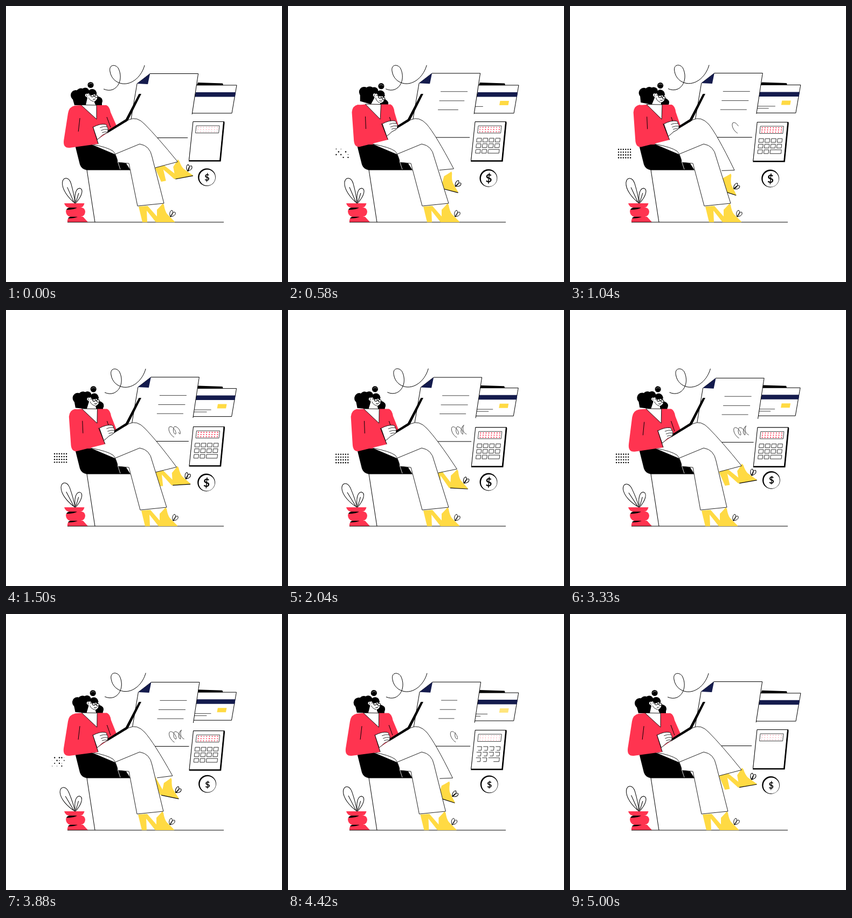
Recreate the animation shown at these times as an HTML page with a canvas. Size 512 px wide and 512 px high, loop 5040 ms.

```html
<!DOCTYPE html>
<html lang="en">
<head>
<meta charset="utf-8">
<title>Working with a laptop</title>
<style>
html, body { margin: 0; width: 100%; height: 100%; overflow: hidden; background: #fff; }
canvas { display: block; width: 100vmin; height: 100vmin; }
</style>
</head>
<body>
<canvas id="stage" width="512" height="512"></canvas>
<script>
const LOOP = 5040;
const RED = '#ff3450', YELLOW = '#ffda43', NAVY = '#141b4d', INK = '#000', GREY = '#444', SEAM = '#222';
const ctx = document.getElementById('stage').getContext('2d');

// Timing helpers
const clamp = v => Math.max(0, Math.min(1, v));
const ramp = (t, a, b) => clamp((t - a) / (b - a));
const angle = t => t / LOOP * Math.PI * 2;
const wave = (t, lag) => (1 - Math.cos(angle(t - lag))) / 2;
const shown = (t, a, b, c, d) => Math.min(ramp(t, a, b), 1 - ramp(t, c, d));

const TYPING = [[0, .02], [580, 1], [1500, 1], [2630, .93], [3330, .15], [3880, 0], [LOOP, .02]];
const LEAN = [[0, 0], [580, 1], [1500, .32], [2630, .22], [3330, .38], [3880, .26], [LOOP, 0]];
const STEP = [[0, 0], [580, 5], [1500, 5], [2630, 5], [3330, -2], [3880, -1], [LOOP, 0]];

function sample(table, t) {
  let i = 1;
  while (i < table.length - 1 && table[i][0] < t) i++;
  const [t0, a] = table[i - 1], [t1, b] = table[i];
  const k = ramp(t, t0, t1);
  return a + (b - a) * (1 - Math.cos(Math.PI * k)) / 2;
}

// Drawing helpers
const NUM = /-?\d+(\.\d+)?/g;
function morph(a, b, k) {
  const end = b.match(NUM);
  let i = 0;
  return a.replace(NUM, n => (+n + (end[i++] - n) * k).toFixed(2));
}

function fill(d, color) {
  ctx.fillStyle = color;
  ctx.fill(new Path2D(d));
}

function line(d, color = INK, width = 1) {
  ctx.strokeStyle = color;
  ctx.lineWidth = width;
  ctx.stroke(new Path2D(d));
}

function shape(d, color, edge = INK, width = 1) {
  fill(d, color);
  line(d, edge, width);
}

function trace(d, length, k, color = GREY) {
  if (k <= 0) return;
  if (k < 1) ctx.setLineDash([length * k, length * 2]);
  line(d, color);
  ctx.setLineDash([]);
}

function disc(x, y, r, color) {
  ctx.fillStyle = color;
  ctx.beginPath();
  ctx.arc(x, y, r, 0, Math.PI * 2);
  ctx.fill();
}

function at(x, y, draw, deg = 0) {
  ctx.save();
  ctx.translate(x, y);
  ctx.rotate(deg * Math.PI / 180);
  draw();
  ctx.restore();
}

const noise = n => {
  const v = Math.sin(n * 91.7 + 3.1) * 4375.85;
  return v - Math.floor(v);
};

// Scenery
function curl(t) {
  at(4 * wave(t, 200), -1.5 * wave(t, 0), () =>
    line('M181 154Q190 158 198 155C212 149 216 130 208 115C202 107 190 109 193 122C195 134 204 142 215 144C235 147 252 129 257 110'));
}

function card(t) {
  at(-wave(t, 300), -3 * wave(t, 300), () => {
    fill('M356 142L402 143.5L403 147H354Z', INK);
    shape('M353 147H428L419 199H345Z', '#fff');
    fill('M352 160H426L425 168.5H350Z', NAVY);
    ctx.globalAlpha = shown(t, 150, 500, 4300, 4700);
    fill('M393.5 176H410L408.5 184H392Z', YELLOW);
    ctx.globalAlpha = 1;
    trace('M346 186.5H381', 35, shown(t, 400, 800, 4300, 4700));
    trace('M345 190.5H373', 28, shown(t, 700, 1100, 4200, 4600));
  });
}

function paper(t) {
  at(4 * wave(t, 290), -Math.sin(angle(t)), () => {
    fill('M267 125.5H356.5L345 201L337 244.5H226L243 144Z', '#fff');
    line('M345 201L356.5 125.5H267L243 144L226 244.5H337');
    fill('M267 125.5L243 144L263 145Z', NAVY);
    [[283, 159.4, 50], [280.5, 176.5, 50], [278, 193.2, 49]].forEach(([x, y, w], i) =>
      trace(`M${x} ${y}h${w}`, w, shown(t, 110 + i * 70, 540 + i * 70, 4200, 4750)));
    trace('M310 237C303 233 298 223 301 218C306 214 315 226 313 231C308 232 307 219 311 217C317 217 323 226 321 231C316 229 317 219 323 214C319 222 323 229 328 231',
      105, shown(t, 700, 1700, 4150, 4750));
  });
}

function keypad(t) {
  const k = shown(t, 120, 590, 4250, 4800);
  const key = (x, y, w, h = 7) =>
    trace(`M${x} ${y}h${w}l-.8 ${h}h${-w}Z`, 2 * (w + h), k, '#333');
  for (let r = 0; r < 3; r++) {
    const y = 245 + r * 10.4, x = 350.5 - r;
    for (let c = 0; c < (r < 2 ? 4 : 2); c++) key(x + c * 11.5, y, 8.5);
    if (r === 2) key(x + 23, y, 20.5);
  }
}

function calculator(t) {
  at(wave(t, 200), 4 * wave(t, 200), () => {
    fill('M347 214H405L405.5 217L398.5 288.5H339Z', INK);
    shape('M347 214.5H403.5L396.5 286.5H339.5Z', '#fff');
    shape('M353 222H396L394.5 235.5H351.5Z', '#fff', GREY);
    for (let r = 0; r < 3; r++) for (let c = 0; c < 8; c++) {
      const d = noise(r * 8 + c) * 200;
      const k = shown(t, 100 + d, 600 + d, 3650 + d, 4200 + d);
      disc(356.5 + c * 5.1 - r * .4, 224.8 + r * 4.1, .55 + .55 * k, RED);
    }
    keypad(t);
  });
}

function coin(t, typing) {
  const s = Math.sin(angle(t));
  at(373 - s, 318 + 2.5 * s, () => {
    disc(-.5, -.4, 16.4, INK);
    disc(.3, .3, 14.8, '#fff');
    ctx.fillStyle = INK;
    ctx.font = `bold ${16 + 4.5 * typing}px Lato, Inter, sans-serif`;
    ctx.textAlign = 'center';
    ctx.textBaseline = 'alphabetic';
    ctx.fillText('$', 0, 6 + 1.5 * typing);
  });
}

function dots(t) {
  at(88 + 2.2 * Math.sin(angle(t)), 265 + 3 * wave(t, 100), () => {
    for (let r = 0; r < 4; r++) for (let c = 0; c < 6; c++) {
      const d = noise(r * 6 + c + 40) * 600;
      const k = shown(t, 250 + d, 400 + d, 3400 + d, 3550 + d);
      if (k) disc(c * 4.4, r * 5.2, 1.2 * k, INK);
    }
  });
}

function plant(t) {
  const k = wave(t, 400);
  at(128, 366, () => {
    line('M0 0C-13 -11 -24 -26 -23 -39C-21 -49.5 -11 -49.5 -7 -37C-4 -26 -1 -14 0 0M-14 -30L-2 -2');
  }, -11 * k);
  at(129, 366, () => {
    line('M0 0C-3 -16 1 -28 8 -28C15 -26 13 -14 0 0M6 -19L1 -3');
  }, -2 * k);
  fill('M108 366H145.5Q144 373 138 374H117Q110 373 108 366Z', RED);
  fill('M118 374H141Q147 376 147 382Q146 390 139 391H119Q111 389 111 380Q113 375 118 374Z', RED);
  fill('M119 391H143L152 401H114Q113 394 119 391Z', RED);
  fill('M112 378Q114 373.5 120 374H132Q126 378 112 378Z', INK);
  fill('M115 394Q117 390.5 122 391H133Q127 394 115 394Z', INK);
}

function seat() {
  line('M114 401H404M150 304L165 401');
  fill('M128 258L170 254L212 275L231 304.5H150Q140 303 137 294Z', INK);
}

// Person
function shoe() {
  fill('M-7 -29L38 -35L45 -16L34 -2L24 -8L10 -26L8 -20Z', '#fff');
  fill('M-7 -29L7 -30L8 -23L9 0H0Z', YELLOW);
  fill('M4 -30L10 -30L31 -6L31 0H25L6 -24Z', YELLOW);
  fill('M27 -23Q34 -30 38 -35L40 -32Q42 -20 46 -15L60 -1V0H27Z', YELLOW);
  line('M52 -10C49 -16 52 -22 55 -22C58 -19 56 -13 52 -10C55 -18 59 -20 61 -18C62 -13 58 -11 52 -10');
}

function legs(t, step) {
  const u = (1 - Math.cos(angle(t - 25) * 3)) / 2;
  at(288 - 41 * u, 326 + 7 * u, () => {
    shoe();
    line('M27 0H60', INK, 1.2);
  }, -11 + 32 * u ** .75);

  const front = morph('L228 211Q243 204 257 219Q281 243 318.5 289', 'L228 211Q243 204 257 219Q271 236 303.5 306.5', u);
  const hem = morph('L277 300', 'L282 306', u);
  fill(`M157 256L187 236${front}${hem}L250 290L248 256L202 275Z`, '#fff');
  line(`M187 236${front}${hem}`, SEAM);

  at(253 + step, 401, shoe);
  const shin = `L228 292L${244 + step} 371L${293 + step} 366L271 280Q267 259 248 256`;
  const under = 'M157 256Q189 262 199 269.5Q205 277 207.5 290';
  fill(`${under}${shin}L202 260Z`, '#fff');
  line(`M207.5 290${shin}L202 275`, SEAM);
  line(under, SEAM);
  line('M207 288L212 303', '#ddd');
}

function torso(lean) {
  const x = 4.5 * lean, y = -1.5 * lean;
  fill(`M${127 + x} ${185 + y}L${139 + x} ${184 + y}L${186 + x} ${184 + y}Q${192 + x} 186 ${194 + x * .8} 197L205 222L190 234L168 257H124L${118 + x} 195Z`, RED);
  shape(`M${139 + x} ${183.5 + y}L${168 + x * .7} 210L${168 + x} ${184 + y}Z`, '#fff', INK, .9);
  line(`M${187 + x * .3} 206L194 225`);
}

function head(lean) {
  at(155 + 4 * lean, 190, () => {
    ctx.translate(-155, -190);
    fill('M123 170L140 154L152 153L154 184H127Z', INK);
    [[129.5, 165.5, 9.5], [134, 174, 8.5], [139, 161.5, 9], [147, 159, 7.5], [160, 162, 8], [171.5, 176, 7.5]].forEach(c => disc(...c, INK));
    fill('M164 168H172L178 172V184H164Z', INK);
    fill('M151 163Q146 162 147 167L151 170L148 184L161 190L168 187L163 177Q169 176 170 167L163 163L158 166L153 162Z', '#fff');
    line('M153 170Q156 176 163 177', INK, .8);
    line('M151 168Q148 166 150 164', INK, .8);
    fill('M152 161Q160 153 169 162L164 164L156 164Z', INK);
    line('M153 165H157M163 167H165', INK, 1);
    for (const [cx, cy] of [[160, 166.5], [167.5, 167.5]])
      line(`M${cx - 2.7} ${cy}a2.7 2.3 0 1 0 5.4 0a2.7 2.3 0 1 0 -5.4 0`, INK, 1.1);
    line('M161 173Q164 174 166 172', INK, 1);
    disc(157, 146.5, 5.6, INK);
    line('M153 146Q157 141.5 161 145', '#bbb', .7);
  }, 16 * lean);
}

function laptop() {
  fill('M246.5 163H251L227 211L224 214L189 235L187 232L222 210Z', INK);
}

function arm(typing, lean) {
  const d = morph('M140 186L127 185Q117 187 115 199L107 249Q105 264 118 263L171 256L161 224L138 232Z',
                  'M140 186L127 184Q117 186 116 198L119.5 248Q120 264 131 262L183 249L171 219L142 228Z', typing);
  at(2.5 * lean * typing, -lean * typing, () => {
    at(11.5 * typing, -5.5 * typing, () => {
      shape('M161 225Q174 218 184 219.5Q188 221 187 224Q190 227 189 230Q189 234 186 236Q178 239 174 244L169 248Z', '#fff', INK, .9);
      line('M174 226Q180 223 187 224M176 231Q182 228 189 229M178 235Q183 233 187 234', INK, .8);
    });
    fill(d, RED);
    line(morph('M161 224L171 256', 'M171 219L183 249', typing));
    line(morph('M137 208L134 233', 'M141 206L142 229', typing));
  });
}

function render(t) {
  const typing = sample(TYPING, t), lean = sample(LEAN, t);
  ctx.fillStyle = '#fff';
  ctx.fillRect(0, 0, 512, 512);
  ctx.lineJoin = 'round';
  curl(t);
  card(t);
  paper(t);
  calculator(t);
  coin(t, typing);
  dots(t);
  // Keep the sheet's hidden corner clear behind the seat and legs
  fill('M205 222L228 211L257 219L274 249H205Z', '#fff');
  plant(t);
  seat();
  head(lean);
  torso(lean);
  legs(t, sample(STEP, t));
  laptop();
  arm(typing, lean);
}

const start = performance.now();
function tick() {
  render((performance.now() - start) % LOOP);
  requestAnimationFrame(tick);
}
tick();
</script>
</body>
</html>
```
